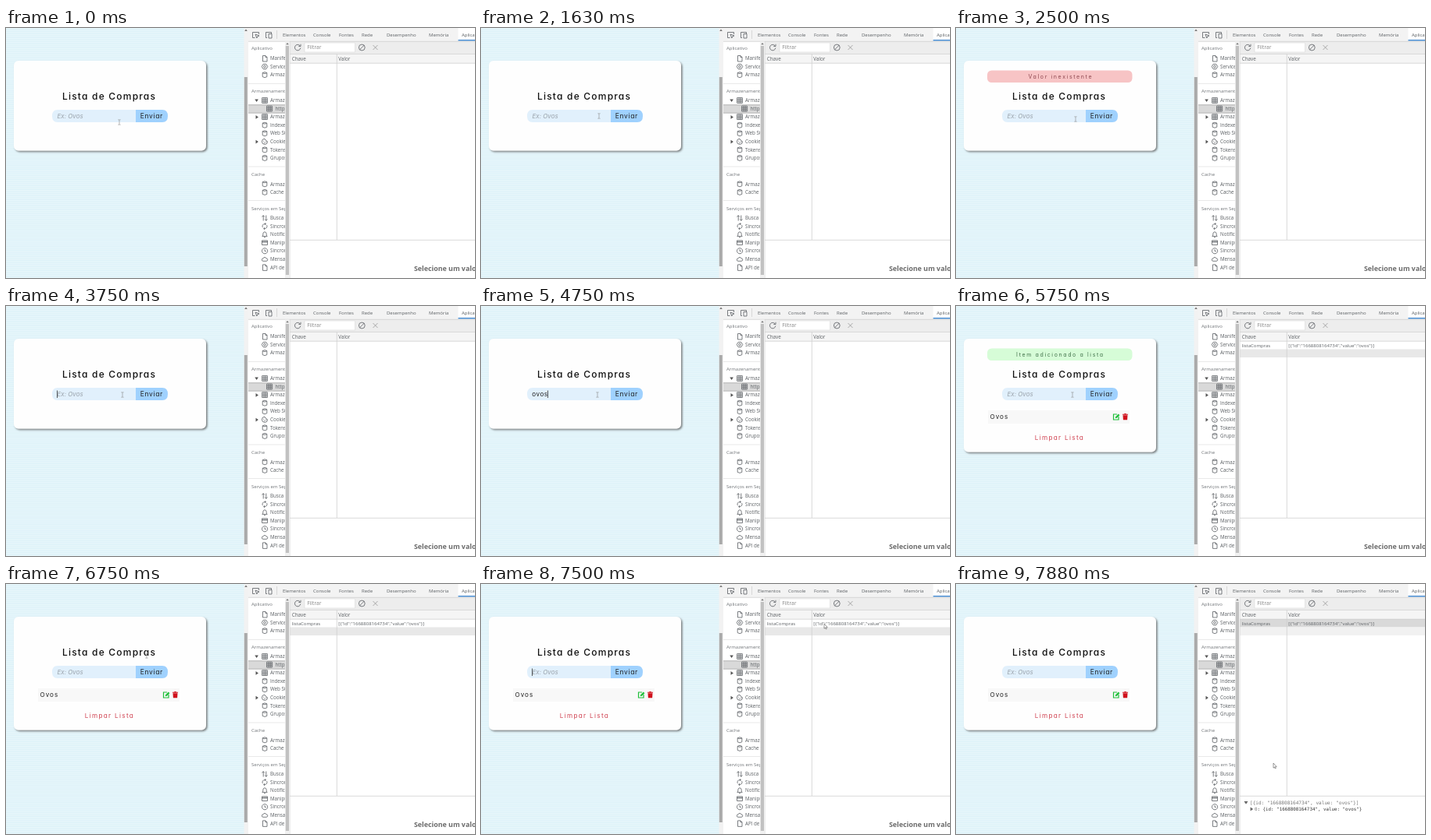
Recreate the animation shown at these times as an HTML page. Size 600 by 321 pixels, loop 8000 ms.

```html
<!DOCTYPE html>
<html lang="pt-BR">
<head>
<meta charset="utf-8">
<title>Lista de Compras</title>
<style>
  html, body { margin: 0; width: 100%; height: 100%; overflow: hidden; }
  svg { display: block; font: 6px "Open Sans", "Noto Sans", sans-serif; }
  text { white-space: pre; fill: #5c6064; }
  .app text { font-family: Inter, sans-serif; font-feature-settings: "cv11"; fill: #222; }
  .app .title { font-size: 12px; font-weight: 500; letter-spacing: 1.2px; fill: #111; }
  .app .field { font-size: 8.1px; letter-spacing: .5px; }
  .app .hint { font-size: 8px; letter-spacing: 0; font-style: italic; fill: #9aa3ab; }
  .app .note { font-size: 7px; letter-spacing: 1.63px; text-anchor: middle; }
  .app .clear { font-size: 8.2px; letter-spacing: 1.3px; fill: #d04352; }
  #sidebar text { font-size: 6.2px; }
  #sidebar .head { font-size: 6px; fill: #707478; }
  .tools .big { font-size: 8.85px; font-weight: 700; fill: #6b6b6b; }
  .tools .mono { font-family: "DejaVu Sans Mono", monospace; font-size: 6.1px; fill: #333; }
  .line { fill: none; stroke: #d0d0d0; stroke-width: .8; }
  .icon { fill: none; stroke: #5a5e62; stroke-width: .8; }
</style>
</head>
<body>
<svg width="600" height="321" viewBox="0 0 600 321">
  <defs>
    <pattern id="stripes" width="8" height="2.6" patternUnits="userSpaceOnUse">
      <rect width="8" height="2.6" fill="#ddf2f9"/>
      <rect width="8" height="1.2" fill="#e9f7fb"/>
    </pattern>
    <filter id="shadow" x="-5%" y="-5%" width="110%" height="115%">
      <feDropShadow dx="1.6" dy="1.6" stdDeviation=".9" flood-color="#555" flood-opacity=".75"/>
    </filter>
    <clipPath id="side"><rect x="310" y="18" width="47" height="303"/></clipPath>
  </defs>

  <g class="app">
    <rect width="305" height="321" fill="url(#stripes)"/>
    <rect id="card" x="10" y="42" width="246" height="115.5" rx="6" fill="#fefefe" filter="url(#shadow)"/>
    <g id="error">
      <rect x="40" y="54.5" width="185.5" height="15.5" rx="5.5" fill="#f7c4c5"/>
      <text class="note" x="133.8" y="64.8" style="fill:#8f4850">Valor inexistente</text>
    </g>
    <g id="success">
      <rect x="40" y="54.5" width="185.5" height="15.5" rx="5.5" fill="#d6fcd7"/>
      <text class="note" x="133.4" y="64.8" style="fill:#42724b">Item adicionado a lista</text>
    </g>
    <text class="title" x="72" y="91.5">Lista de Compras</text>
    <path d="M166 105H66q-7 0-7 8t7 8h100z" fill="#e1f0fc"/>
    <path d="M166 105h34q7 0 7 8t-7 8h-34z" fill="#9fd1fe"/>
    <text class="field" x="171.7" y="116" style="font-size:8.5px;letter-spacing:.65px">Enviar</text>
    <text id="hint" class="field hint" x="65.5" y="116">Ex: Ovos</text>
    <text id="typed" class="field" x="65.3" y="116"></text>
    <rect id="caret" y="108.5" width=".8" height="9.5" fill="#333"/>
    <g id="list">
      <rect x="41" y="134" width="181" height="17" fill="#f8f8f8"/>
      <text class="field" x="43.5" y="145.2" style="letter-spacing:1px">Ovos</text>
      <path d="M206 139h-4.5v7h6.5v-4" fill="none" stroke="#1fbf3a" stroke-width="1.2"/>
      <path d="M203.8 144.2l.4-2 3.6-3.6 1.6 1.6-3.6 3.6z" fill="#1fbf3a"/>
      <path d="M213 138.7h2l.5-.7h2l.5.7h2v1h-7zM213.5 140.2h6l-.4 6h-5.2z" fill="#d0101c"/>
      <text class="clear" x="100.8" y="172.4">Limpar Lista</text>
    </g>
    <rect x="304.5" width="5.5" height="321" fill="#f2f2f2"/>
    <rect x="304.8" y="63" width="4" height="243" fill="#aaa"/>
    <path d="M305.2 4l1.8-2.4 1.8 2.4z" fill="#777"/>
  </g>

  <g class="tools">
    <rect x="310" width="290" height="321" fill="#fff"/>
    <rect x="310" width="290" height="17" fill="#f3f3f3"/>
    <rect x="578.5" width="22" height="17" fill="#fff"/>
    <rect x="363" y="17" width="237" height="16.4" fill="#ededed"/>
    <rect x="363" y="33.4" width="237" height="11.8" fill="#f5f5f5"/>
    <rect x="382" y="19" width="64.5" height="12" fill="#fff" stroke="#ddd" stroke-width=".7"/>
    <g id="tabs"></g>
    <g id="entry">
      <rect id="row" x="363" y="45" width="237" height="10.5"/>
      <rect id="blank" x="363" y="55.5" width="237" height="10.5"/>
      <text x="365.7" y="52.6">listaCompras</text>
      <text x="425.3" y="52.6">[{"id":"1668808164734","value":"ovos"}]</text>
    </g>
    <path class="line" d="M310 17.3H600M363 33.4H600M363 45.2H600M423.3 33.4V272M363 272.3H600M346.5 3v11M363 17V321"/>
    <rect x="578.5" y="15" width="22" height="1.4" fill="#3b84cc"/>
    <g class="icon">
      <path d="M323.5 8V5.5h-8v7h3M319 8l5 2-2.2.8-1 2.2z"/>
      <path d="M334 12.5h-1.5v-7h7v2M336 7.5h4v5.5h-4z"/>
      <path d="M376.2 23a3.7 3.7 0 1 0 .6 2.6M377 20.8v2.7h-2.7"/>
      <circle cx="455.3" cy="25" r="3.9"/><path d="M452.6 27.7l5.4-5.4"/>
      <path d="M469.5 22l6 6m0-6l-6 6" stroke="#999"/>
    </g>
    <text x="385.2" y="27.2" style="font-size:6.7px;fill:#888">Filtrar</text>
    <text x="365.7" y="41.5" style="font-size:6.3px">Chave</text>
    <text x="425.3" y="41.5" style="font-size:6.3px">Valor</text>
    <g id="sidebar" clip-path="url(#side)"></g>
    <rect x="357" y="17.5" width="6" height="304" fill="#f1f1f1"/>
    <rect x="357.8" y="23" width="4.2" height="294" fill="#c1c1c1"/>
    <path d="M358.2 21.2l1.8-2.2 1.8 2.2z" fill="#777"/>
    <text id="prompt" class="big" x="522" y="312">Selecione um valor para visualizar</text>
    <g id="preview">
      <path d="M368.5 279h5l-2.5 3.8zM376.6 286.5v5l3.6-2.5z" fill="#666"/>
      <text class="mono" x="376" y="282.8" style="fill:#777">[{id: "1668808164734", value: "ovos"}]</text>
      <text class="mono" x="382" y="291.2" style="font-size:5.85px"><tspan fill="#777">0</tspan>: {id: "1668808164734", value: "ovos"}</text>
    </g>
  </g>

  <g id="cursor">
    <path id="beam" d="M-1.6-3.2h1.2l.4.4.4-.4h1.2M0-3V3M-1.6 3.2h1.2l.4-.4.4.4h1.2" fill="none" stroke="#888" stroke-width=".6"/>
    <path id="hand" d="M-1 1v-4.5q.7-.8 1.3 0v2.5l3 .6q.8.3.7 1.2l-.6 3.2h-3.6l-2.3-3q.4-1 1.5 0z" fill="#fff" stroke="#444" stroke-width=".6"/>
    <path id="arrow" d="M-1-3v6.2l1.4-1.2.9 2 1-.5-.9-1.9h1.8z" fill="#fff" stroke="#555" stroke-width=".6"/>
  </g>
</svg>
<script>
const LOOP = 8000, STEP = 125;
const $ = id => document.getElementById(id);
const label = (x, y, text, cls = '') => `<text class="${cls}" x="${x}" y="${y}">${text}</text>`;

// Outline icons in an 8 x 8 box
const icons = {
  doc: 'M1.5.5h3.5l2 2v5.5h-5.5zM5 .5v2h2',
  gear: 'M2.2.8h3.6l2 3.2-2 3.2h-3.6l-2-3.2zM2.6 4a1.4 1.4 0 1 0 2.8 0a1.4 1.4 0 1 0-2.8 0',
  db: 'M1.2 1.5q2.8-2 5.6 0v5q-2.8 2-5.6 0zq2.8 2 5.6 0',
  grid: 'M.6.6h6.8v6.8h-6.8zM3 .6v6.8M5.2.6v6.8M.6 3h6.8M.6 5.2h6.8',
  cookie: 'M4 .4a3.6 3.6 0 1 0 3.6 3.6q-1.8 0-1.8-1.8-1.8 0-1.8-1.8M2.3 3.5h1M3 5.7h1M5 4.6h1',
  swap: 'M2.2 7.5v-6.8M.5 2.5l1.7-1.8 1.7 1.8M5.8.5v6.8M4.1 5.5l1.7 1.8 1.7-1.8',
  sync: 'M1.4 5.5a3 3 0 0 1 2.6-4.5h1M4-.4l1.5 1.4-1.5 1.4M6.6 2.5a3 3 0 0 1-2.6 4.5h-1M4 8.4l-1.5-1.4 1.5-1.4',
  bell: 'M.8 6.3h6.4l-1-1.3v-2q-.4-2.3-2.2-2.3t-2.2 2.3v2zM3 7.6h2',
  card: 'M.5 1.2h7v5.6h-7zM.5 2.6h7M.5 3.2h7',
  clock: 'M4 .4a3.6 3.6 0 1 0 .1 0M4 2v2.2h1.8',
  cloud: 'M2 6.5a1.7 1.7 0 0 1 0-3.4a2.1 2.1 0 0 1 4 0a1.7 1.7 0 0 1 0 3.4z'
};

// Sections: heading, heading y, first row y, rows as "icon text"
const sections = [
  ['Aplicativo', 26.2, 39, ['doc Manifesto', 'gear Service Workers', 'db Armazenamento']],
  ['Armazenamento', 80.7, 93, ['grid Armazenamento', 'grid https://', 'grid Armazenamento',
    'db Indexed DB', 'db Web SQL', 'cookie Cookies', 'db Tokens', 'db Grupos']],
  ['Cache', 187.7, 200.3, ['db Armazenamento', 'db Cache']],
  ['Serviços em Segundo Plano', 231.8, 244, ['swap Busca em', 'sync Sincronização', 'bell Notificações',
    'card Manipulador', 'clock Sincronização', 'cloud Mensagens', 'doc API de']]
];

function sidebarMarkup() {
  let out = '<rect x="309" y="98.8" width="50" height="10.3" fill="#d9d9d9" stroke="#a5a5a5" stroke-width=".8"/>' +
    '<path class="line" d="M310 71.5h47M310 178h47M310 221.5h47" style="stroke:#e4e4e4"/>' +
    '<path d="M318.3 91.5h4.6l-2.3 3.6zM319.5 112v4.8l3.4-2.4zM319.5 143.7v4.8l3.4-2.4z" fill="#555"/>';
  for (const [name, headY, top, rows] of sections) {
    out += label(314, headY + 2.2, name, 'head');
    rows.forEach((row, i) => {
      const [icon, ...words] = row.split(' ');
      const text = words.join(' '), y = top + i * 10.56, x = text === 'https://' ? 333 : 327;
      out += `<path class="icon" transform="translate(${x} ${y - 4})" d="${icons[icon]}"/>` +
        label(x === 333 ? 344.5 : 338, y + 2.2, text);
    });
  }
  return out;
}
$('sidebar').innerHTML = sidebarMarkup();
$('tabs').innerHTML = [[354, 'Elementos'], [393, 'Console'], [426, 'Fontes'], [455, 'Rede'],
  [487, 'Desempenho'], [541, 'Memória'], [583, 'Aplicativo']]
  .map(([x, name]) => label(x, 10.8, name)).join('');

// Pointer path: time, x, y
const path = [[0, 145, 121], [250, 145, 116], [375, 145, 116], [625, 161, 139], [875, 161, 139],
  [1000, 157, 137], [1250, 157, 137], [1625, 151, 113], [2000, 178, 114], [2125, 178, 114],
  [2500, 153, 117], [3375, 153, 117], [3500, 149, 114], [6250, 149, 114], [6750, 180, 92],
  [7375, 440, 56], [7625, 440, 52], [7875, 407, 233], [LOOP, 407, 233]];

function pointerAt(t) {
  const i = path.findIndex(p => p[0] > t);
  const [t0, x0, y0] = path[i - 1], [t1, x1, y1] = path[i];
  const k = (t - t0) / (t1 - t0);
  return [x0 + (x1 - x0) * k, y0 + (y1 - y0) * k];
}

const show = (id, on) => { $(id).style.display = on ? '' : 'none'; };
const between = (t, a, b) => t >= a && t < b;

function draw(ms) {
  const t = Math.floor((ms + 5) / STEP) * STEP % LOOP;
  const added = t >= 5125, selected = t >= 7625;

  show('error', between(t, 2250, 3750));
  show('success', between(t, 5125, 6250));
  show('list', added);
  show('entry', added);
  show('preview', selected);
  show('prompt', !selected);
  $('card').setAttribute('height', added ? 145.5 : 115.5);
  $('row').setAttribute('fill', selected ? '#d9d9d9' : '#fff');
  $('blank').setAttribute('fill', selected ? '#f1f1f1' : '#e8e8e8');

  const typing = between(t, 4375, 5125);
  const word = typing ? 'ovos'.slice(0, (t - 4250) / STEP) : '';
  const typed = $('typed');
  if (typed.textContent !== word) typed.textContent = word;
  show('hint', !typing);
  const blinkOn = t < 4375 ? t < 4000 : Math.floor((t - 250) / 500) % 2 === 0;
  show('caret', typing || between(t, 3375, 7625) && blinkOn);
  $('caret').setAttribute('x', 65 + (word ? typed.getComputedTextLength() : 0));

  const [x, y] = pointerAt(t);
  const overButton = between(x, 166, 207) && between(y, 105, 121);
  const overText = between(y, 82, 122) && x < 193;
  $('cursor').setAttribute('transform', `translate(${x} ${y})`);
  show('hand', overButton);
  show('beam', !overButton && overText);
  show('arrow', !overButton && !overText);
}

const start = performance.now();
function tick() {
  draw((performance.now() - start) % LOOP);
  requestAnimationFrame(tick);
}
tick();
</script>
</body>
</html>
```
